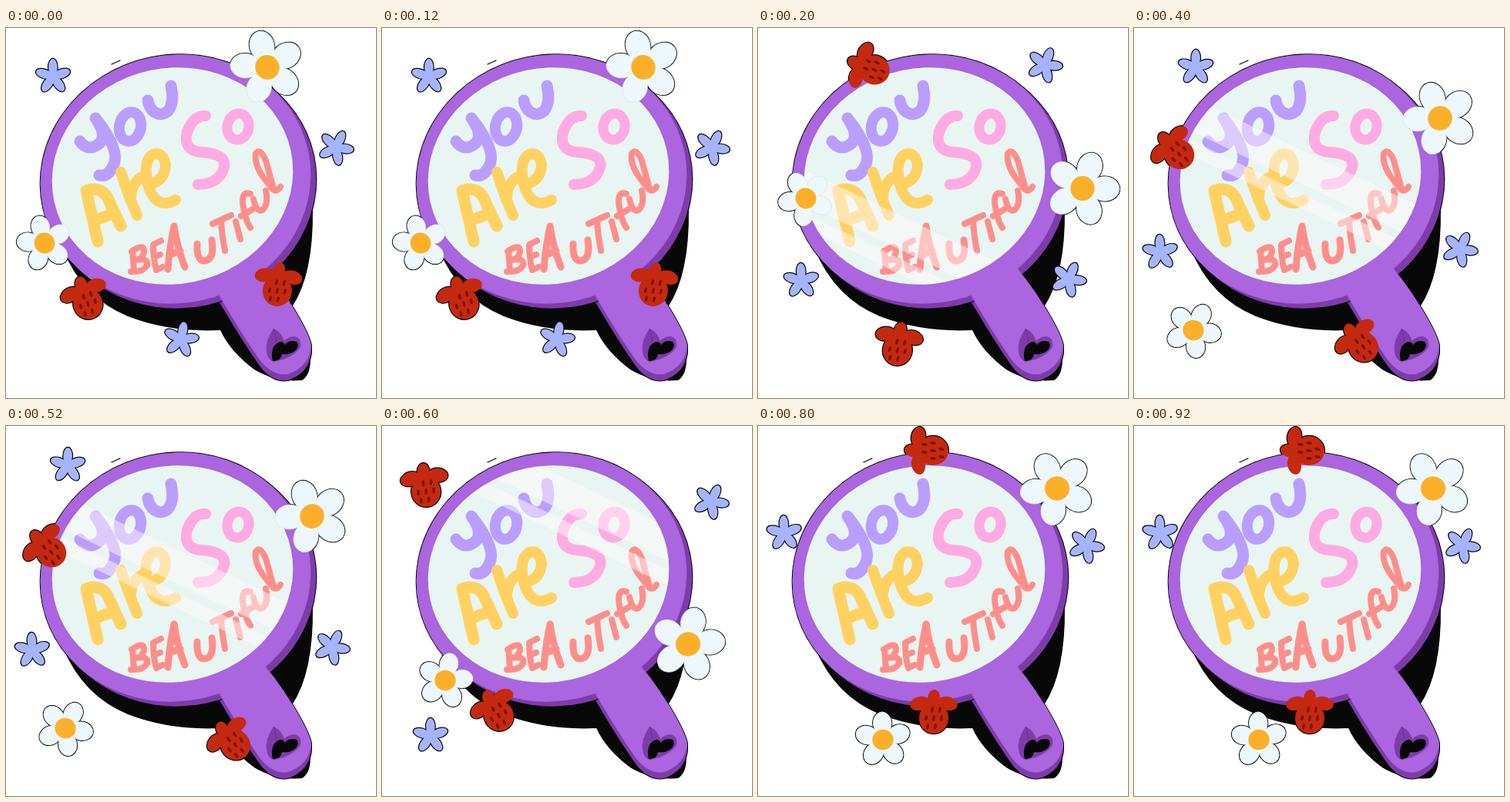
An HTML page with a canvas for the animation above (1 s loop, 480 by 480 pixels).

```html
<!DOCTYPE html>
<html lang="en">
<head>
<meta charset="utf-8">
<title>You are so beautiful</title>
<style>
  html, body { margin: 0; width: 100%; height: 100%; overflow: hidden; background: #fff; }
  canvas { display: block; width: 480px; height: 480px; }
</style>
</head>
<body>
<canvas id="stage" width="480" height="480"></canvas>
<script>
const ctx = document.getElementById('stage').getContext('2d');
const STEP = 200, POSES = 5, FIFTH = 72;
const INK = '#080808', FACE = '#aa65df', SIDE = '#7d3ca9';
const rad = deg => deg * Math.PI / 180;

function blob(x, y, rx, ry, deg = 0) {
  const p = new Path2D();
  p.ellipse(x, y, rx, ry, rad(deg), 0, Math.PI * 2);
  return p;
}

// Five equal lobes around the origin
function lobes(dist, rx, ry) {
  return Array.from({ length: 5 }, (_, i) => {
    const deg = i * FIFTH;
    return blob(dist * Math.cos(rad(deg)), dist * Math.sin(rad(deg)), rx, ry, deg);
  });
}

function fill(path, color) {
  ctx.fillStyle = color;
  ctx.fill(path);
}

function line(path, color, width) {
  ctx.strokeStyle = color;
  ctx.lineWidth = width;
  ctx.stroke(path);
}

function write(color, width, d) {
  line(new Path2D(d), color, width);
}

function place([x, y, deg], paint) {
  ctx.save();
  ctx.translate(x, y);
  ctx.rotate(rad(deg));
  paint();
  ctx.restore();
}

// Mirror
const disc = blob(220, 196, 176, 161, -12);
const glass = blob(216, 192, 157, 140, -12);
const shadow = new Path2D('M74 288 Q100 350 158 374 Q212 395 278 392 Q291 420 322 443 Q350 460 384 457 Q396 450 395 425 L371 362 Q399 320 398 236 Z');
const handle = new Path2D('M260 320 L318 290 Q351 327 372 362 Q394 398 396 412 Q394 439 366 449 Q347 452 331 433 Q306 398 273 341 Z');
const hole = new Path2D('M347 390 Q336 406 338 420 Q340 432 348 433 Q373 428 382 414 Q384 401 373 400 Q365 401 361 406 Q357 394 347 390 Z');
const heart = new Path2D('M346 432 Q342 414 353 408 Q359 405 362 411 Q367 404 377 407 Q381 411 376 418 Q368 425 358 423 Q357 432 346 432 Z');

function extrude(path, dx, dy) {
  for (let k = 0; k <= 1; k += .125) {
    ctx.save();
    ctx.translate(dx * k, dy * k);
    line(path, INK, 2);
    ctx.restore();
  }
  for (let k = 0; k <= 1; k += .125) {
    ctx.save();
    ctx.translate(dx * k, dy * k);
    fill(path, SIDE);
    ctx.restore();
  }
}

function lettering() {
  const lilac = '#b99eff', yellow = '#ffd160', pink = '#ffaae3', coral = '#ff8e8b';
  // You
  write(lilac, 15, 'M96 147 Q107 162 122 149 Q131 138 116 117 Q150 160 139 179 Q132 194 121 191');
  line(blob(161, 128, 14, 19, 12), lilac, 14);
  write(lilac, 15, 'M184 94 C188 120 224 120 214 75');
  // Are
  write(yellow, 15, 'M119 277 L104 211 Q126 203 135 227 L149 257 M114 250 L141 240');
  write(yellow, 14, 'M149 187 Q159 218 170 243 M162 219 Q163 198 181 191');
  write(yellow, 14, 'M186 203 Q206 198 207 178 Q204 160 191 164 Q177 172 184 203 Q194 237 220 223');
  // So
  write(pink, 14, 'M259 114 Q243 113 235 135 Q229 159 253 161 Q287 163 283 181 Q276 203 249 203');
  line(blob(301, 128, 14, 17, 12), pink, 13);
  // Beautiful
  write(coral, 8, 'M164 289 L166 315 M163 290 Q180 278 179 291 Q177 300 168 301 Q186 298 183 308 Q178 317 162 316');
  write(coral, 8, 'M201 276 L191 281 Q191 300 195 314 L203 310 M192 297 L200 294');
  write(coral, 9, 'M210 313 Q212 285 218 257 Q222 285 232 310 M213 294 L226 289');
  write(coral, 9, 'M248 280 Q247 303 258 302 Q271 300 267 275');
  write(coral, 8, 'M268 254 L292 243 M279 250 Q280 268 284 289 M298 251 L304 274');
  write(coral, 8, 'M317 215 Q304 211 308 233 Q311 251 317 259 M305 244 L320 235');
  write(coral, 8, 'M321 222 Q325 240 333 236 Q341 228 337 211');
  write(coral, 8, 'M356 206 Q350 216 343 205 Q321 181 324 163 Q330 155 337 172 Q342 190 347 208');
}

function mirror() {
  fill(shadow, INK);
  extrude(handle, 0, 8);
  extrude(disc, 7, 6);
  fill(disc, FACE);
  fill(handle, FACE);
  fill(hole, SIDE);
  fill(heart, INK);
  write('#63308a', 1, 'M348 391 L351 407');
  fill(glass, '#e8f5f2');
  lettering();
}

// Diagonal light sweeping up the glass
function glint(pose) {
  if (pose < 1 || pose > 3) return;
  const top = 256 - pose * 101;
  ctx.save();
  ctx.clip(glass);
  ctx.transform(1, .48, 0, 1, 0, top);
  ctx.fillStyle = 'rgba(255, 250, 250, .5)';
  ctx.fillRect(0, 0, 480, 44);
  ctx.fillRect(0, 56, 480, 20);
  ctx.restore();
}

// Props: each has its outline shapes and a paint function
function daisy(r) {
  const petals = lobes(r * .6, r * .4, r * .33);
  return {
    parts: petals,
    paint() {
      petals.forEach(p => fill(p, '#eef7fb'));
      petals.forEach(p => line(p, '#dae6eb', .8));
      fill(blob(0, 0, r * .48, r * .48), '#eef7fb');
      fill(blob(0, 0, 6 + r * .2, 6.5 + r * .2), '#fcb02a');
    }
  };
}

const berryParts = [
  blob(0, 1, 19, 20), blob(0, -12, 15, 9),
  blob(-18, -18, 13, 9, -12), blob(0, -25, 8, 11, 10), blob(18, -18, 13, 9, 12)
];
const berry = {
  parts: berryParts,
  paint() {
    berryParts.forEach(p => fill(p, '#c5290f'));
    for (let i = 0; i < 7; i++) {
      const row = Math.floor((i + 1) / 3);
      const x = ((i + 1) % 3 - 1) * 10 + row * 2 - 2;
      fill(blob(x, row * 11 - 10, 1.8, 3.8, 8), '#7d1509');
    }
  }
};

const starParts = [...lobes(12, 11, 5.8), blob(0, 0, 7, 7)];
const star = {
  parts: starParts,
  paint: () => starParts.forEach(p => fill(p, '#a6b4ff'))
};

const turning = (from, by) => (x, y, i) => from + by * i;
const leaning = x => x / 14 - 95;

// Where each prop hops to; berries carry their own tilt
const props = [
  { shape: daisy(48), tilt: turning(-32, 33), hops: [[339, 51], [421, 208], [397, 117], [397, 283], [388, 81]] },
  { shape: daisy(36), tilt: turning(-32, -15), hops: [[50, 279], [62, 221], [77, 392], [82, 330], [162, 407]] },
  { shape: berry, hops: [[106, 357, -20], [150, 54, -70], [58, 163, -45], [57, 84, -8], [226, 32, -90]] },
  { shape: berry, hops: [[352, 340, 5], [181, 417, 8], [297, 413, -40], [151, 375, -30], [228, 378, 0]] },
  { shape: star, tilt: leaning, hops: [[61, 63], [56, 328], [80, 51], [63, 402], [34, 139]] },
  { shape: star, tilt: leaning, hops: [[428, 155], [372, 48], [34, 291], [427, 98], [426, 155]] },
  { shape: star, tilt: leaning, hops: [[227, 404], [403, 326], [423, 287]] }
];

function draw(now) {
  const i = Math.floor(now / STEP) % POSES;
  const shown = props.filter(p => p.hops[i]).map(({ shape, tilt, hops }) => {
    const [x, y, deg] = hops[i];
    return { shape, at: [x, y, deg ?? tilt(x, y, i)] };
  });

  ctx.fillStyle = '#fff';
  ctx.fillRect(0, 0, 480, 480);
  ctx.lineCap = ctx.lineJoin = 'round';
  // Dark edges lie under the mirror, so they show on white only
  write(INK, 1.3, 'M137 47 L148 42');
  for (const { shape, at } of shown) place(at, () => shape.parts.forEach(p => line(p, INK, 2.4)));
  mirror();
  glint(i);
  for (const { shape, at } of shown) place(at, shape.paint);
}

const start = performance.now();
function tick() {
  draw(performance.now() - start);
  requestAnimationFrame(tick);
}
tick();
</script>
</body>
</html>
```
